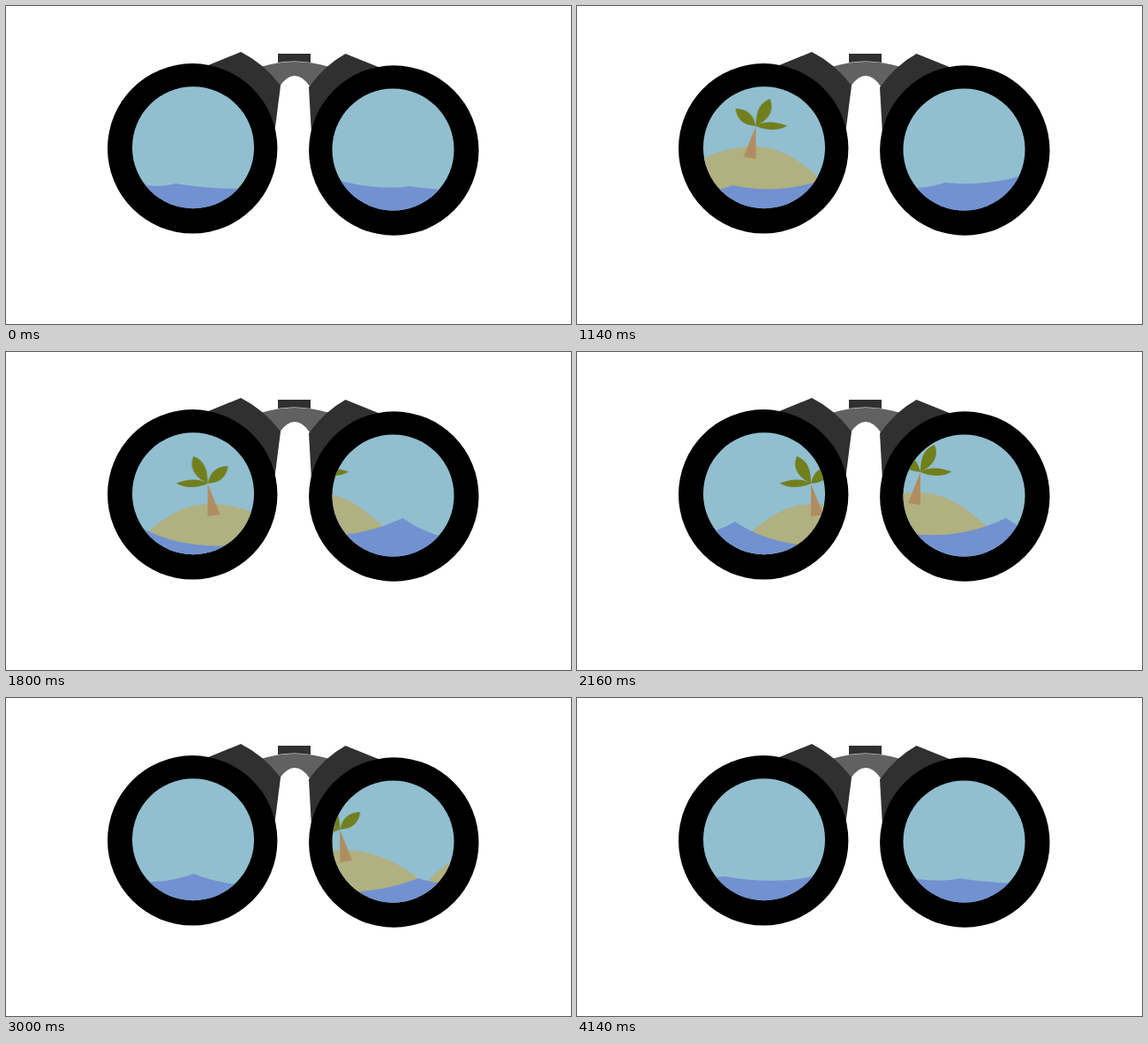
Write an HTML page without scripts that moves like this. It is 640 px wide and 360 px high and loops after 4200 ms.

```html
<!DOCTYPE html>
<html lang="en">
<head>
<meta charset="utf-8">
<title>Binoculars</title>
<style>
  html, body { margin: 0; width: 100%; height: 100%; overflow: hidden; background: #fff; }
  svg { display: block; width: 100vw; height: 100vh; }
  .sky { fill: #91bfd0; }
  .sea { fill: #7191d0; }
  .sand { fill: #b0b080; }
  .trunk { fill: #b08d60; }
  .leaf { fill: #717f1d; }
  .dark { fill: #303030; }
  .pan { animation: pan 4.2s -1ms infinite; }

  /* quick sweep, slow look at the islands, quick sweep */
  @keyframes pan {
    0% { transform: translateX(0); animation-timing-function: steps(28); }
    40% { transform: translateX(683.2px); animation-timing-function: steps(16); }
    62.8571% { transform: translateX(780.8px); animation-timing-function: steps(26); }
    100% { transform: translateX(1415.2px); }
  }
</style>
</head>
<body>
<svg viewBox="0 0 640 360" xmlns="http://www.w3.org/2000/svg">
  <defs>
    <clipPath id="lensL"><circle cx="212" cy="160.2" r="69"/></clipPath>
    <clipPath id="lensR"><circle cx="438.5" cy="162.5" r="69"/></clipPath>

    <g id="island">
      <path class="sand" d="M-105 225V206C-75 175-38 159-4 159C30 159 52 177 70 193L94 214V225Z"/>
      <path class="trunk" d="M0 136L-14 171L0 173Z"/>
      <path class="leaf" d="M0 136C-3 122-10 117-23 116C-22 128-14 135 0 136Z"/>
      <path class="leaf" d="M0 136C0 119 4 110 16 105C21 117 16 128 0 136Z"/>
      <path class="leaf" d="M0 136C10 129 24 131 35.500 135.500C25 142 12 141 0 136Z"/>
    </g>

    <!-- the stretch of scenery both lenses pass over -->
    <g id="coast">
      <use href="#island" transform="translate(-261 0)"/>
      <use href="#island" transform="translate(-467 13) scale(-1 1)"/>
      <path class="sea" d="M-715 250V199C-670 217-600 219-553 192C-515 218-450 232-378 204
        C-350 214-310 213-288 203C-255 209-215 212-164 188C-120 219-75 218-28 200
        C-8 206 8 209 35 200V250Z"/>
    </g>
  </defs>

  <path fill="#616161" d="M288 69Q327 57 367 69L344 91Q336 79 327 79Q318 79 310 91Z"/>
  <path class="dark" d="M308 54H345V64Q327 61 308 64Z"/>
  <path class="dark" d="M228 67.500L266 52Q292 65 311 90L304 145H250Z"/>
  <path class="dark" d="M423 69.500L384.500 54Q361 67 343 92L346 145H400Z"/>

  <circle cx="211.200" cy="161.300" r="96.200"/>
  <circle cx="439.300" cy="163.500" r="96.200"/>

  <g clip-path="url(#lensL)">
    <rect class="sky" x="140" y="88" width="145" height="145"/>
    <g class="pan">
      <use href="#coast"/>
      <path class="sea" d="M-1330 250V207Q-1270 206-1223 202C-1185 209-1120 212-1089 185
        C-1040 216-900 224-838 191C-800 210-755 214-715 199L-713 200V250Z"/>
      <path class="sea" d="M33 250V201L35 200C70 203 105 200 130 178C140 200 160 209 192 201
        C225 206 265 210 300 203V250Z"/>
    </g>
  </g>

  <g clip-path="url(#lensR)">
    <rect class="sky" x="366" y="90" width="145" height="145"/>
    <g transform="translate(-82 0)">
      <g class="pan">
        <use href="#coast"/>
        <path class="sea" d="M-985 250V188C-950 203-905 211-875 204C-835 211-760 215-715 199
          L-713 200V250Z"/>
        <path class="sea" d="M33 250V201L35 200C75 204 120 198 155 178C240 205 360 222 434 188
          C460 201 505 209 540 204C565 208 600 210 640 209V250Z"/>
      </g>
    </g>
  </g>
</svg>
</body>
</html>
```
